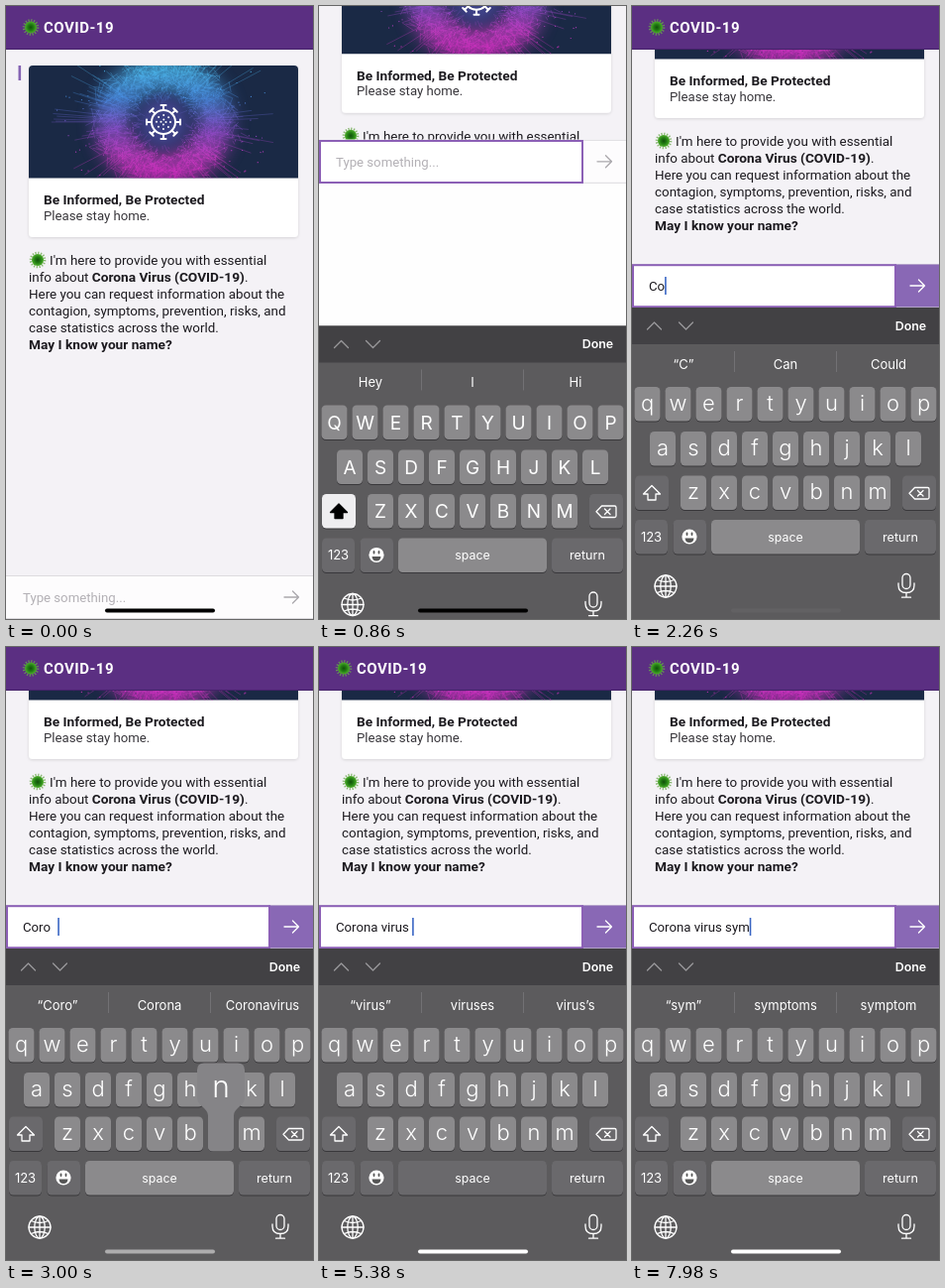
Animation of 310x618 px, one loop 8000 ms. Source, as an HTML page:

```html
<!DOCTYPE html>
<html lang="en">
<head>
<meta charset="utf-8">
<title>Chat</title>
<style>
  html, body { margin: 0; width: 100%; height: 100%; overflow: hidden; background: #fff; }
  #stage { display: block; width: 310px; height: 618px; }
  text { font: 13.4px Roboto, "Open Sans", sans-serif; fill: #1c1a1f; }
  .b { font-weight: 600; font-size: 13.7px; }
  #keyboard text, #pop text { font-family: Inter, Roboto, sans-serif; fill: #fff; text-anchor: middle; }
  .line { fill: none; stroke: #fff; stroke-width: 1.3; stroke-linecap: round; stroke-linejoin: round; }
</style>
</head>
<body>
<svg id="stage" viewBox="0 0 310 618">
  <defs>
    <radialGradient id="ball"><stop offset="0" stop-color="#124f0b"/><stop offset=".5" stop-color="#217d12"/><stop offset="1" stop-color="#4fae2c"/></radialGradient>
    <linearGradient id="hue" gradientUnits="userSpaceOnUse" x1="0" y1="-57" x2="0" y2="57">
      <stop offset="0" stop-color="#4fc6f6"/><stop offset=".3" stop-color="#4a8ee6"/><stop offset=".55" stop-color="#8a50cf"/><stop offset=".8" stop-color="#d23ccb"/><stop offset="1" stop-color="#d42cc0"/>
    </linearGradient>
    <radialGradient id="core"><stop offset="0" stop-color="#363f80"/><stop offset=".5" stop-color="#474796" stop-opacity=".8"/><stop offset="1" stop-color="#4a45a0" stop-opacity="0"/></radialGradient>
    <filter id="glow" x="-50%" y="-50%" width="200%" height="200%"><feGaussianBlur stdDeviation="9"/></filter>
    <filter id="shadow" x="-10%" y="-10%" width="120%" height="125%"><feDropShadow dx="0" dy="1" stdDeviation="1.5" flood-opacity=".13"/></filter>
    <g id="virus">
      <circle r="7" fill="none" stroke="#6aa84c" stroke-width="2.6" stroke-dasharray="1.2 1.55" opacity=".8"/>
      <circle r="6" fill="url(#ball)"/>
    </g>
  </defs>

  <rect width="310" height="618" fill="#fefefe"/>
  <g id="page">
    <svg id="view" width="310" height="574">
      <rect width="310" height="618" fill="#f4f2f6"/>
      <g id="messages">
        <rect x="12.5" y="60" width="2.6" height="15" fill="#8463b3"/>
        <rect x="23" y="60" width="272" height="173" rx="4" fill="#fff" filter="url(#shadow)"/>
        <svg x="23" y="60" width="272" height="113.500" viewBox="-136 -57 272 113.500">
          <rect x="-136" y="-57" width="272" height="120" rx="4" fill="#1a2945"/>
          <ellipse rx="52" ry="48" fill="none" stroke="url(#hue)" stroke-width="34" filter="url(#glow)" opacity=".7"/>
          <g id="burst" fill="url(#hue)" stroke="url(#hue)"></g>
          <circle r="33" fill="url(#core)"/>
          <g id="badge" fill="none" stroke="#fff" stroke-width="2" stroke-linecap="round"><circle r="12"/><circle r="7" stroke-dasharray="0 5.498"/><circle r="2.500" stroke-dasharray="0 3.927"/></g>
        </svg>
        <text x="38" y="200" class="b">Be Informed, Be Protected</text>
        <text x="38" y="215.5" style="font-size:13.2px;fill:#38363b">Please stay home.</text>
        <use href="#virus" x="32" y="256"/>
        <text x="44" y="261">I'm here to provide you with essential</text>
        <text x="23" y="278">info about <tspan class="b">Corona Virus (COVID-19)</tspan>.</text>
        <text x="23" y="295">Here you can request information about the</text>
        <text x="23" y="312">contagion, symptoms, prevention, risks, and</text>
        <text x="23" y="329">case statistics across the world.</text>
        <text x="23" y="346" class="b">May I know your name?</text>
      </g>
    </svg>
    <rect width="310" height="44" fill="#45216a"/>
    <rect width="310" height="43" fill="#5b2f82"/>
    <use href="#virus" x="25" y="21.5"/>
    <text x="38" y="27" style="font-weight:600;font-size:15px;letter-spacing:.5px;fill:#fff">COVID-19</text>

    <g id="bar">
      <rect width="310" height="44" fill="#fdfcfd"/>
      <path d="M0 .5H310M0 43.500H310" stroke="#dddbdf"/>
      <rect id="send" x="265" y=".5" width="45" height="43" fill="#8968b5"/>
      <rect id="focus" x="1" y="1.2" width="265" height="42" fill="#fff" stroke="#8c60b6" stroke-width="2"/>
      <text id="typed" x="17" y="27"></text>
      <rect id="caret" y="13" width="1.6" height="18" fill="#3a66c4"/>
      <path id="arrow" class="line" d="M281 22h14.500m-6-6l6 6l-6 6"/>
    </g>
  </g>

  <g id="keyboard">
    <rect y="304" width="310" height="314" fill="#5c5b5d"/>
    <rect y="304" width="310" height="37" fill="#424144"/>
    <path class="line" d="M15.500 326l7-7l7 7M47.500 319l7 7l7-7" style="stroke:#99989b"/>
    <path d="M103.500 348v21M206.500 348v21" stroke="#727174"/>
    <g id="keys"></g>
    <path id="shift" class="line" d="M20 483.500l8.500 8.500h-4.500v6h-8v-6h-4.500z"/>
    <path class="line" d="M285.500 485.500h13q1.500 0 1.500 1.500v8.500q0 1.500-1.500 1.500h-13l-5.500-5.700zM288.500 488.500l5.500 5.500m0-5.500l-5.500 5.500"/>
    <circle cx="58" cy="535" r="7.6" fill="#fff"/>
    <path d="M53.500 536.500h9q-.5 4.500-4.500 4.500t-4.500-4.500z" fill="#555"/>
    <path d="M55.500 531.500v1.500M60.500 531.500v1.500" class="line" style="stroke:#555;stroke-width:1.8"/>
    <path class="line" d="M23 585h22M34 574v22M25.500 578.500q8.500 4 17 0M25.500 591.500q8.500-4 17 0"/>
    <circle class="line" cx="34" cy="585" r="11"/><ellipse class="line" cx="34" cy="585" rx="5.200" ry="11"/>
    <rect class="line" x="273" y="572.500" width="8" height="15" rx="4"/>
    <path class="line" d="M269 582v2q0 7.500 8 7.500t8-7.500v-2M277 592v4M272.500 596.200h9"/>
  </g>
  <g id="pop">
    <path fill="#858487" d="M-24-47q0-7 7-7h34q7 0 7 7v28c0 8-11 10-11 18v31q0 5-5 5h-16q-5 0-5-5v-31c0-8-11-10-11-18z"/>
    <text id="popChar" y="-20" style="font-size:30px;font-weight:300"></text>
  </g>
  <rect id="home" x="100" y="607.500" width="111" height="4" rx="2"/>
</svg>

<script>
const $ = id => document.getElementById(id);
const LOOP = 8000, PRESS = 110, CARET_LEAD = 75, HINT_LAG = 370;
const MESSAGE = "Corona virus sym";
const PRESSES = [1800, 2150, 2420, 2620, 2920, 3200, 3550, 3860, 4160, 4450, 4700, 4980, 5300, 6960, 7270, 7590];
const HINTS = ["Hey|I|Hi", "“C”|Can|Could", "“Co”|Could|Come", "“Cor”|Corona|Core",
  "“Coro”|Corona|Coronavirus", "“Coron”|Corona|Coronavirus", "“Corona”|Coronavirus|Coronas",
  "is|and|symptoms", "“v”|virus|vaccine", "“vi”|virus|video", "“vir”|virus|virtual",
  "“viru”|virus|viruses", "“virus”|viruses|virus’s", "is|dangerous|and", "“s”|symptoms|spread",
  "“sy”|symptoms|symptom", "“sym”|symptoms|symptom"].map(h => h.split("|"));

function add(parent, tag, attrs, text) {
  const el = document.createElementNS("http://www.w3.org/2000/svg", tag);
  for (const k in attrs) el.setAttribute(k, attrs[k]);
  if (text) el.textContent = text;
  return parent.appendChild(el);
}
const set = (id, name, value) => $(id).setAttribute(name, value);
const move = (id, x, y) => set(id, "transform", `translate(${x} ${y})`);
const ramp = (t, a, b) => Math.min(1, Math.max(0, (t - a) / (b - a)));
const easeOut = (x, power) => 1 - (1 - x) ** power;
const smooth = x => x * x * (3 - 2 * x);

// Burst artwork: a lace of short chords in a ring, with thin spikes outside it
let seed = 7;
const rnd = () => (seed = seed * 16807 % 2147483647) / 2147483647;
const polar = (a, r) => (Math.cos(a) * r * 1.12).toFixed(1) + " " + (Math.sin(a) * r).toFixed(1);
let lace = "", spikes = "", dots = "";
for (let i = 0; i < 1500; i++) {
  const a = rnd() * Math.PI * 2, r = 21 + 50 * (rnd() + rnd()) / 2;
  lace += `M${polar(a, r)}L${polar(a + rnd() * .36 - .18, r + rnd() * 16 - 8)}`;
}
for (let i = 0; i < 170; i++) {
  const a = rnd() * Math.PI * 2, r = 35 + rnd() * 20;
  spikes += `M${polar(a, r)}L${polar(a, 60 + rnd() ** 2 * 42)}`;
}
for (let i = 0; i < 260; i++) dots += `M${polar(rnd() * 7, 28 + rnd() ** 1.5 * 70)}h.1`;
add($("burst"), "path", { d: lace, "stroke-width": .55, opacity: .6, fill: "none" });
add($("burst"), "path", { d: spikes, "stroke-width": .5, opacity: .6 });
add($("burst"), "path", { d: dots, "stroke-width": 1.2, "stroke-linecap": "round", opacity: .8 });
for (let i = 0; i < 8; i++)
  add($("badge"), "path", { d: "M0-12v-4.500M-2.500-17h5", transform: `rotate(${i * 45})` });

// Keyboard
const keyAt = {}, letters = [];
function key(x, y, w, fill, label, size) {
  add($("keys"), "rect", { x, y: y + 1, width: w, height: 34.5, rx: 4.5, fill: "#39383b" });
  const cap = add($("keys"), "rect", { x, y, width: w, height: 34.5, rx: 4.5, fill });
  const text = label && add($("keys"), "text", { x: x + w / 2, y: y + 21.5, style: `font-size:${size}px` }, label);
  return { cap, text };
}
["qwertyuiop", "asdfghjkl", "zxcvbnm"].forEach((row, r) => [...row].forEach((c, i) => {
  const x = [15.5, 31, 62][r] + i * 31, y = [384, 429, 473.5][r];
  const { text } = key(x - 13, y, 26, "#8b8a8c", c, 22);
  keyAt[c] = [x, y];
  letters.push({ c, y, text });
}));
const DIM = "#6a696c";
const shiftKey = key(3, 473.5, 34, DIM).cap;
key(273, 473.5, 34, DIM);
key(3, 518, 33, DIM, "123", 13);
key(41.5, 518, 33.5, DIM);
const spaceKey = key(80, 518, 150, "#8b8a8c", "space", 12.4).cap;
key(235, 518, 72, DIM, "return", 12.6);
add($("keys"), "text", { x: 281.5, y: 327, style: "font-size:12.4px;font-weight:600" }, "Done");
const hints = [52, 155, 259].map(x => add($("keys"), "text", { x, y: 366, style: "font-size:13px" }));

let wasUpper;
function setCase(upper) {
  if (upper === wasUpper) return;
  wasUpper = upper;
  for (const { c, y, text } of letters) {
    text.textContent = upper ? c.toUpperCase() : c;
    text.style.fontSize = upper ? "19px" : "22px";
    text.style.fontWeight = upper ? 400 : 300;
    text.setAttribute("y", y + (upper ? 24.5 : 23.5));
  }
  shiftKey.setAttribute("fill", upper ? "#efeef0" : DIM);
  $("shift").style.cssText = upper ? "fill:#000;stroke:#000" : "";
}

const countAt = (t, delay) => PRESSES.filter(p => p + delay <= t).length;
const prefix = n => MESSAGE.slice(0, n).replace(/ /g, "\u00a0");

function draw(t) {
  const open = t >= 520, height = open ? 304 : 618;
  const rise = easeOut(ramp(t, 520, 920), 1.48);
  const back = smooth(ramp(t, 960, 1290));
  move("keyboard", 0, 314 * (1 - rise));
  move("page", 0, -125.6 * easeOut(ramp(t, 520, 920), 3) * (1 - back));
  move("messages", 0, -120 * back);
  set("view", "height", height - 44);
  move("bar", 0, height - 44);

  const n = countAt(t, PRESS), typed = $("typed");
  typed.style.fontSize = "13.2px";
  typed.textContent = prefix(countAt(t, CARET_LEAD));
  const caretX = 17 + (typed.textContent ? typed.getComputedTextLength() : 0);
  typed.textContent = n ? prefix(n) : "Type something...";
  typed.style.fill = n ? "#1c1a1f" : "#b3b0b5";
  set("caret", "x", caretX);
  const idle = t - (n ? PRESSES[n - 1] + PRESS : 900);
  set("caret", "opacity", t > 900 && idle % 1000 < 600 ? 1 : 0);
  set("focus", "opacity", open ? 1 : 0);
  set("send", "opacity", n ? 1 : 0);
  $("arrow").style.stroke = n ? "#fff" : "#aaa8ac";

  setCase(n === 0);
  HINTS[countAt(t, HINT_LAG)].forEach((h, i) => hints[i].textContent = h);

  const held = PRESSES.findIndex(p => t >= p && t < p + PRESS);
  const c = held < 0 ? "" : MESSAGE[held];
  const at = c && keyAt[c.toLowerCase()];
  set("pop", "visibility", at ? "visible" : "hidden");
  if (at) { move("pop", ...at); $("popChar").textContent = c; }
  spaceKey.setAttribute("fill", c === " " ? DIM : "#8b8a8c");

  set("home", "fill", t < 1400 ? "#000" : "#fff");
  set("home", "opacity", t < 1400 ? 1 - ramp(t, 900, 1300) : ramp(t, 2200, 3800));
}

function frame() {
  draw(performance.now() % LOOP);
  requestAnimationFrame(frame);
}
frame();
</script>
</body>
</html>
```
